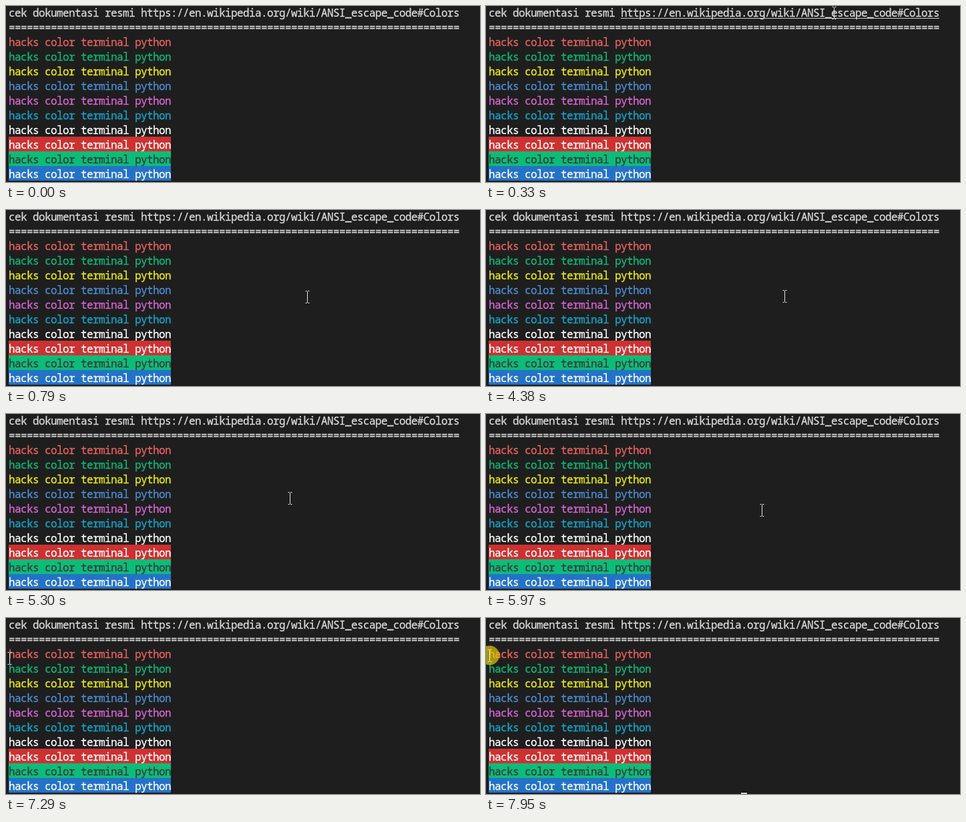
An HTML page that plays this animation: 710x264 px, repeating every 8 s.

```html
<!DOCTYPE html>
<html lang="id">
<head>
<meta charset="utf-8">
<title>Terminal colors</title>
<style>
  html, body { margin: 0; width: 100%; height: 100%; overflow: hidden; background: #1e1e1e; }
  svg { display: block; }
  text {
    font: 16px "Noto Sans Mono", "DejaVu Sans Mono", monospace;
    font-variant-ligatures: none;
    letter-spacing: -0.6px;
    stroke-width: 0.3px;
  }
</style>
</head>
<body>
<svg width="710" height="264" viewBox="0 0 710 264">
  <rect width="710" height="264" fill="#1e1e1e"/>
  <g id="rows"></g>
  <rect id="underline" x="202" y="18" width="477" height="1" fill="#cccccc"/>
  <rect id="caret" x="382" y="262" width="9" height="2" fill="#cccccc"/>
  <circle id="click" cx="5.5" cy="56" r="14.5" fill="#ffe600" fill-opacity="0.6"/>
  <path id="pointer" fill="none" stroke="#e6e6e6"
        d="M-3 -9H-1L0 -8L1 -9H3M0 -8V8M-3 9H-1L0 8L1 9H3"/>
</svg>
<script>
const LOOP = 8000, STEP = 65, LINE = 22, LEFT = 4, CHAR = 9;
const byId = id => document.getElementById(id);

function add(tag, attrs, content = "") {
  const node = document.createElementNS("http://www.w3.org/2000/svg", tag);
  for (const key in attrs) node.setAttribute(key, attrs[key]);
  node.textContent = content;
  byId("rows").append(node);
}

function addRow(index, content, color, back = "none") {
  const top = index * LINE - 2;
  add("rect", { x: LEFT, y: top, width: content.length * CHAR, height: LINE, fill: back });
  add("text", { x: LEFT, y: top + 18, fill: color, stroke: color }, content);
}

const styles = [
  ["#e8635f"], ["#0dbc79"], ["#f0f010"], ["#4e8ed3"], ["#d766d4"], ["#11a8cd"], ["#ffffff"],
  ["#ffffff", "#cd3131"], ["#393939", "#0dbc79"], ["#ffffff", "#2472c8"]
];
addRow(0, "cek dokumentasi resmi https://en.wikipedia.org/wiki/ANSI_escape_code#Colors", "#d8d8d8");
addRow(1, "=".repeat(75), "#cccccc");
styles.forEach(([color, back], i) => addRow(i + 2, "hacks color terminal python", color, back));

// Each move glides from the previous place in equal jumps, one per STEP.
const move = (start, jumps, x, y) => ({ start, jumps, x, y });
const moves = [
  move(130, 4, 521, 10),
  move(400, 4, 466, 252),
  move(660, 3, 451, 130),
  move(4380, 6, 427, 123),
  move(5300, 4, 420, 136),
  move(5710, 1, 416, 142),
  move(5970, 1, 413, 144),
  move(6030, 1, 404, 149),
  move(6230, 3, 387, 152),
  move(6560, 2, 163, 131),
  move(6690, 1, 0, 90),
  move(7020, 5, 5, 60),
  move(7480, 2, 5, 56)
];

function pointerAt(time) {
  const place = { x: 546, y: -2 };
  for (const { start, jumps, x, y } of moves) {
    if (time < start) break;
    const progress = Math.min(1, (Math.floor((time - start) / STEP) + 1) / jumps);
    place.x += (x - place.x) * progress;
    place.y += (y - place.y) * progress;
  }
  return place;
}

const between = (time, from, to = LOOP) => time >= from && time < to;
const show = (id, visible) => byId(id).setAttribute("visibility", visible ? "visible" : "hidden");

function render(time) {
  const { x, y } = pointerAt(time);
  byId("pointer").setAttribute("transform", `translate(${Math.round(x) + 0.5} ${Math.round(y) + 0.5})`);
  show("pointer", between(time, 130, 6690) || between(time, 7020));
  show("underline", between(time, 260, 400));
  show("click", between(time, 7880));
  show("caret", between(time, 7950));
}

const start = performance.now();
function tick() {
  render((performance.now() - start) % LOOP);
  requestAnimationFrame(tick);
}
tick();
</script>
</body>
</html>
```
